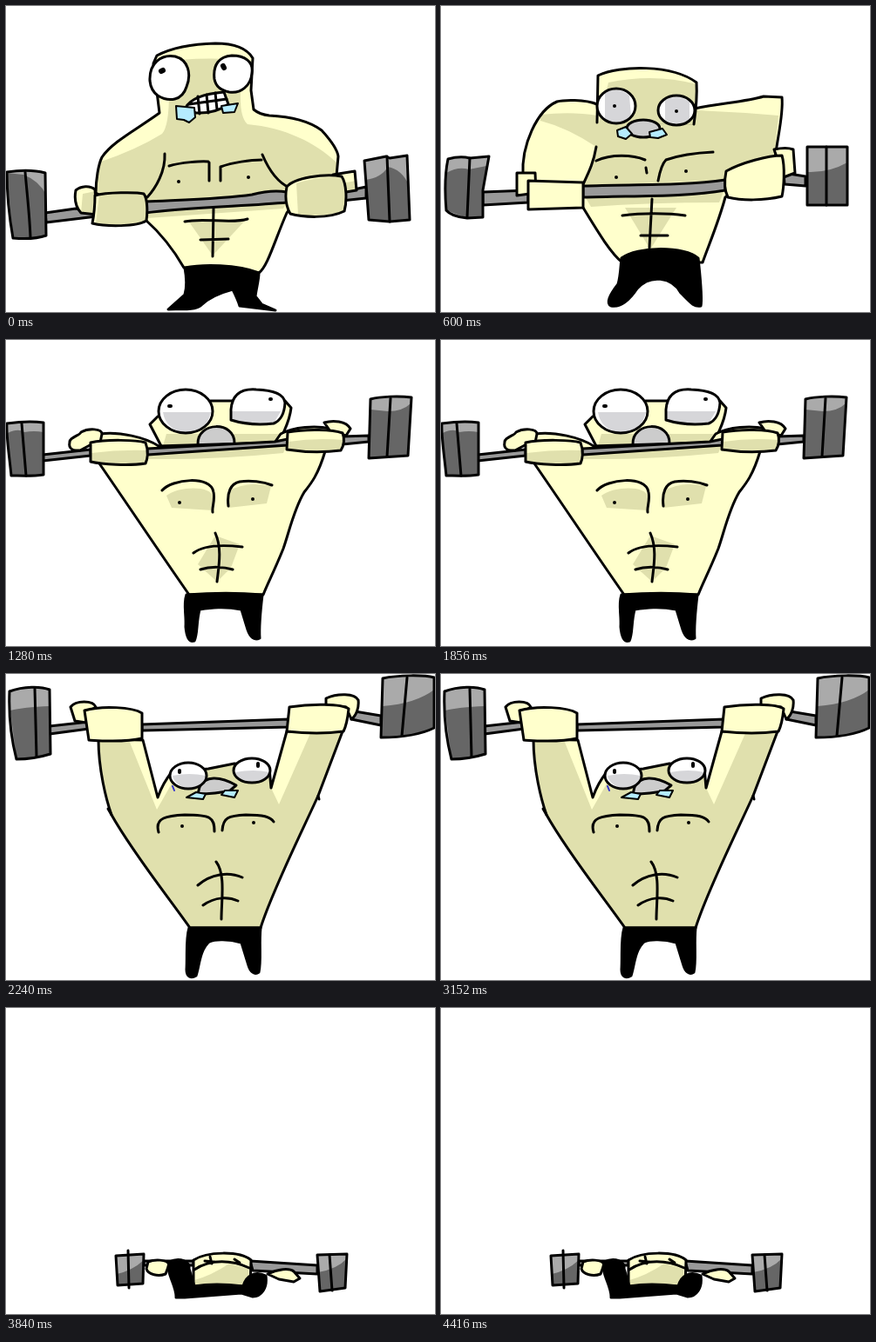
Recreate the animation shown at these times as an HTML page without scripts. Size 492x352 px, loop 4800 ms.

```html
<!DOCTYPE html>
<html lang="en">
<head>
<meta charset="utf-8">
<title>Weightlifter</title>
<style>
html, body { margin: 0; width: 100%; height: 100%; overflow: hidden; background: #fff; }
svg { display: block; width: 100%; height: 100%; }
path, ellipse { fill: none; stroke: #000; stroke-width: 3; stroke-linecap: round; stroke-linejoin: round; }
.skin { fill: #ffffcc; }
.metal { fill: #999; }
.disc { fill: #aaa; }
.white { fill: #fff; }
.black { fill: #000; }
.mouth { fill: #ccc; }
.tear { fill: #b5ecff; stroke-width: 2; }
.dot { stroke-width: 4; }
.shade, .dark, .dim { stroke: none; mix-blend-mode: multiply; }
.shade { fill: #e0e0d9; }
.dark { fill: #999; }
.dim { fill: #d6d6d9; }
/* poses sit side by side, 600 apart; the strip jumps between them */
#strip { animation: lift 4800ms step-end infinite; }
@keyframes lift {
  0% { transform: translateX(0); }
  12.5% { transform: translateX(-600px); }
  23.3333% { transform: translateX(-1200px); }
  26.6667% { transform: translateX(-1800px); }
  46.6667% { transform: translateX(-2400px); }
  78.3333% { transform: translateX(-3000px); }
  80%, 100% { transform: translateX(-3600px); }
}
</style>
</head>
<body>
<svg viewBox="0 0 492 352">
<g id="strip">

<!-- grip -->
<g>
  <path class="metal" d="M45 238L80 233L104 236V242L46 249ZM385 214L413 208V221L385 224Z"/>
  <path class="disc" d="M1 191C15 189 30 188 45 192L46 264C35 268 20 268 8 267C5 250 1 220 1 191ZM411 178L436 173L440 175L460 172L463 246L440 248L416 246Z"/>
  <path class="dark" d="M1 192L20 194Q38 201 46 217V264Q28 268 8 267ZM412 200Q430 198 438 185Q454 188 462 206L463 246L440 248L416 246Z"/>
  <path d="M22 191C24 215 27 240 28 266M437 173L440 248"/>
  <path class="skin" d="M176 123L169 66L173 57Q198 44 240 43C262 43 276 48 283 60L281 97L284 119Q291 125 302 126C325 127 347 132 362 143C372 154 380 164 381 173L378 207L335 222L322 238C308 270 300 300 290 307L204 301C192 280 178 262 160 246L103 215C103 200 106 182 110 174C122 156 150 142 176 123Z"/>
  <path class="shade" d="M171 66Q220 57 283 63L269 100Q268 128 277 136C320 140 355 157 379 180L378 205L322 222V226L318 233L162 244L160 225L104 214Q104 190 109 179Q150 165 179 147Q187 138 187 100Z"/>
  <path class="shade" d="M209 247L274 247L237 287Z"/>
  <path d="M182 170C183 190 172 209 162 220M294 171C302 190 312 203 325 209"/>
  <path class="metal" d="M160 225C200 223 250 222 282 217Q305 211 322 214V226C280 230 200 232 160 238Z"/>
  <path class="skin" d="M80 212C86 207 96 206 102 211L104 240L86 238Q77 228 80 212ZM375 194L400 190L402 212L378 216Z"/>
  <path class="shade" d="M88 216L103 213L104 240L86 238ZM380 205L401 201L402 212L378 216Z"/>
  <path class="skin" d="M102 218C115 214 150 214 158 216C163 222 162 240 161 247C150 254 115 254 99 250Q102 235 102 218ZM322 208C330 198 365 192 385 196C391 205 391 225 388 236C370 245 340 243 326 239C321 230 320 218 322 208Z"/>
  <path class="shade" d="M107 217Q140 214 158 217Q163 230 160 247Q130 254 103 250ZM333 204Q360 195 385 197Q391 215 388 236Q360 243 335 240Z"/>
  <path class="white" d="M165 86C164 66 178 55 194 58C209 62 213 78 207 93C202 109 187 111 174 103Q166 97 165 86ZM239 84C237 67 245 58 259 57C274 57 284 64 282 77C281 92 269 101 256 99Q241 96 239 84Z"/>
  <path d="M178 75L180 74M249 69L250 71" style="stroke-width:6"/>
  <path class="dot" d="M198 202h0M278 197h0"/>
  <path class="white" d="M206 117Q214 102 250 99L255 113Q240 124 218 123Z"/>
  <path stroke-width="2" d="M210 113L253 107M220 104L222 124M230 102L232 123M240 100L242 119"/>
  <path class="tear" d="M195 115L216 117L217 128L210 134L204 131L196 130ZM247 115L266 112L262 122L249 123Z"/>
  <path d="M187 184C200 180 225 178 232 179M233 180V201M246 201L246 185C260 180 280 177 293 177M238 233L237 288M205 248C225 243 260 251 277 245M223 269L255 268"/>
  <path class="black" d="M205 301C225 297 265 297 290 307C290 315 287 325 286 334L293 343L309 350L268 345C266 338 262 330 260 326C245 330 232 336 224 344C215 351 200 348 186 349L205 332C208 322 207 312 205 301Z"/>
</g>

<!-- chest height -->
<g transform="translate(600)">
  <path class="metal" d="M48 214L100 212V226L48 229ZM393 192L418 196V207L394 205Z"/>
  <path class="disc" d="M8 176Q22 172 33 175L55 173L48 212V243L30 244C20 243 10 240 6 235Q3 200 8 176ZM420 162H466V229H420Z"/>
  <path class="dark" d="M6 192Q20 184 32 188L52 184L48 212V243L30 244L6 235ZM420 191Q445 192 466 180V229H420Z"/>
  <path d="M33 175L30 243M442 162V229"/>
  <path class="skin" d="M179 113C165 107 140 108 133 110C110 120 92 160 94 195L163 232C180 260 195 285 208 295H300C305 280 318 250 326 220L383 176C386 150 393 125 391 105L370 104C350 110 320 112 291 118Z"/>
  <path class="shade" d="M114 125Q150 121 179 126L293 120Q340 122 387 126L382 174L326 196V200L163 207L178 162Q145 140 114 132ZM166 221L324 214L319 226Q240 226 172 231Z"/>
  <path class="shade" d="M211 232H270L240 280Z"/>
  <path class="skin" d="M179 134L180 80C205 68 265 67 293 88C294 104 292 122 290 136"/>
  <path class="shade" d="M192 88Q245 77 293 90L290 137L181 134Z"/>
  <path d="M178 162C175 180 170 190 163 205"/>
  <path class="metal" d="M163 207C220 205 280 207 326 200V212C280 220 220 218 163 220Z"/>
  <path class="skin" d="M87 192H108L109 215L87 218ZM382 165Q396 162 404 165L406 192L393 197Z"/>
  <path class="skin" d="M100 201L163 203V232L100 234ZM327 190C345 180 375 172 391 172C395 185 393 210 391 219C370 224 345 224 329 220C325 212 325 200 327 190Z"/>
  <ellipse class="white" cx="201" cy="115" rx="22" ry="20"/>
  <ellipse class="white" cx="270" cy="120" rx="21" ry="17"/>
  <path class="dim" d="M188 99Q205 93 216 103L218 127Q202 141 188 130ZM257 108Q272 101 285 110V131Q270 139 257 131Z"/>
  <path class="dot" d="M199 115h0M270 121h0M201 197h0M281 190h0"/>
  <ellipse class="mouth" cx="232" cy="141" rx="19" ry="10"/>
  <path class="tear" d="M202 143L212 139L219 147L212 153L203 150ZM239 145L254 141L259 148L249 152L240 151Z"/>
  <path d="M178 178C195 170 220 171 234 177M235 186L236 192M249 201C251 190 253 182 258 177C275 171 290 169 312 168M242 222L239 278M208 241C230 238 260 238 280 241M229 264H260"/>
  <path class="black" d="M207 290C225 276 280 276 295 290C297 310 300 335 298 345C290 347 285 340 275 330C265 312 240 308 225 325C215 340 205 347 195 345C189 342 193 333 203 320C206 310 206 298 207 290Z"/>
</g>

<!-- neck height -->
<g transform="translate(1200)">
  <path class="metal" d="M39 168L102 167V178L39 179ZM385 158H416V168L387 170Z"/>
  <path class="disc" d="M2 119L22 118L24 123L42 124L37 198L22 197L4 194ZM418 120C430 115 455 117 469 120L466 188C450 192 430 190 417 187Z"/>
  <path class="dark" d="M2 134L23 142L41 142L37 198L22 197L4 194ZM418 142Q450 147 468 128L466 188Q440 192 417 187Z"/>
  <path d="M23 120V197M443 117V190"/>
  <path class="skin" d="M175 115C140 108 100 97 80 97C68 98 62 112 68 122C78 135 95 148 102 158L138 186C160 220 185 280 206 294H297C312 265 325 215 338 178L375 142C410 125 437 105 434 90C430 80 405 80 380 88C350 100 320 122 292 117Z"/>
  <path class="shade" d="M90 122Q140 128 179 119L290 118Q330 120 367 107L348 152L326 160L162 172L125 161Z"/>
  <path class="shade" d="M180 179L238 178V201L190 207ZM254 179L312 177L305 192L254 198ZM240 225L270 245L240 280L217 247Z"/>
  <path class="skin" d="M183 135L166 95L174 85L218 70H255L304 78C302 95 293 114 288 128"/>
  <path class="shade" d="M194 104L222 80H260L292 96L296 103L288 129L183 135L176 116Z"/>
  <path class="metal" d="M162 171C220 163 270 160 326 160V168C270 170 220 170 162 178Z"/>
  <path class="skin" d="M90 158L112 155V164L102 178H92ZM376 146L397 147L396 157L385 163Z"/>
  <path class="skin" d="M102 162Q135 159 162 165V186L102 191ZM326 153Q360 149 387 154V178L326 177Z"/>
  <ellipse class="white" cx="197" cy="82" rx="23" ry="24"/>
  <ellipse class="white" cx="273" cy="75" rx="20" ry="21"/>
  <path class="dim" d="M175 80Q198 76 219 84Q215 104 197 105Q177 101 175 80ZM254 73Q275 68 292 76Q288 95 273 95Q256 92 254 73Z"/>
  <path class="dot" d="M184 71v2M285 72v1M200 196h0M282 190h0"/>
  <path class="mouth" d="M214 118C220 103 240 94 250 117Q232 124 214 118Z"/>
  <path class="tear" d="M205 122L224 121L222 130L213 127ZM238 122L254 118L259 125L248 129Z"/>
  <path d="M185 178C205 175 235 176 237 182L238 200M251 199C251 185 253 178 260 176H310M242 224V280M208 244C220 240 255 241 277 241M229 265H259"/>
  <path class="black" d="M206 293C230 290 270 290 296 293C294 310 293 330 291 341C287 345 282 342 279 330L276 315C255 314 235 312 226 314C222 325 220 335 215 344C210 347 205 345 205 338Z"/>
</g>

<!-- mouth height -->
<g transform="translate(1800)">
  <path class="metal" d="M42 132L97 126V133L42 139ZM386 111L416 110V117L386 120Z"/>
  <path class="disc" d="M1 96C15 94 30 93 43 95V155C30 157 15 156 6 156C4 135 0 110 1 96ZM418 68C430 65 450 64 465 66L461 133L416 136Z"/>
  <path class="dark" d="M2 107Q14 101 21 106Q32 104 43 106V155Q20 158 6 156ZM418 80L438 82Q455 82 464 73L461 133L416 136Z"/>
  <path d="M18 96L23 156M441 67L437 134"/>
  <path class="skin" d="M178 122L165 97L174 88L235 70H260L320 70L327 78C325 95 315 115 308 122"/>
  <path class="shade" d="M184 108H314L308 122H180Z"/>
  <path class="mouth" d="M220 120C219 93 263 93 262 119"/>
  <path class="skin" d="M108 108C130 105 160 112 175 122L308 118L315 108C330 100 355 98 372 102L366 128C358 155 350 165 342 175C330 195 325 220 318 240C308 265 300 280 295 293H210C180 250 140 190 107 142Z"/>
  <path class="shade" d="M163 131L322 121L318 130Q240 138 163 137ZM184 179C200 167 236 168 237 180V196L190 193ZM255 174Q275 162 304 168L299 188L255 193ZM240 225L268 235L258 262L242 278L220 258Z"/>
  <path class="metal" d="M162 125L308 117L323 114V121L162 132Z"/>
  <path class="skin" d="M73 118C72 112 85 110 86 106C95 101 110 102 110 108L108 118L98 120L85 127C73 128 72 122 73 118ZM365 95C375 92 390 93 395 102L390 110L372 105Z"/>
  <path class="skin" d="M97 118C115 114 150 115 160 118C164 128 162 138 160 142C140 145 110 143 97 140ZM323 106C345 102 375 103 386 107C389 115 387 122 384 127C360 130 335 128 322 126Z"/>
  <path class="shade" d="M98 130Q130 126 161 127L160 141Q125 144 98 139ZM324 117Q355 112 387 115L384 126Q345 129 324 125Z"/>
  <ellipse class="white" cx="206" cy="82" rx="31" ry="25"/>
  <path class="white" d="M258 80Q260 55 287 57Q318 58 320 72Q319 91 307 96Q280 99 258 92Z"/>
  <path class="dim" d="M180 83H235Q230 106 206 107Q183 103 180 83ZM259 82H315L307 96Q280 99 259 92Z"/>
  <path class="dot" d="M187 76h2M303 68h1M199 187h0M283 183h0"/>
  <path d="M179 173C190 160 235 155 238 175C240 185 236 192 237 198M255 191C253 175 258 165 268 163C280 161 295 163 305 167M240 222C248 240 244 260 242 278M215 245C225 237 245 235 271 238M223 264C235 260 250 261 260 264"/>
  <path class="black" d="M207 293C235 291 270 291 294 293C292 310 290 330 291 343C285 346 280 342 277 333L270 310C250 306 235 308 222 310C218 325 220 338 216 346C210 348 207 342 206 330C207 315 203 305 207 293Z"/>
</g>

<!-- overhead -->
<g transform="translate(2400)">
  <path class="metal" d="M50 60L95 55V63L50 69ZM400 43L430 48V59L396 52Z"/>
  <path class="disc" d="M4 20C20 14 40 14 50 18L51 92C35 97 20 98 12 98C6 75 3 45 4 20ZM432 5C450 1 480 1 491 4V62C475 70 450 73 430 73Z"/>
  <path class="dark" d="M5 42Q20 38 50 37L51 92Q30 98 12 98ZM432 37Q470 34 491 18V62Q465 73 430 73Z"/>
  <path d="M33 17L35 95M460 4L454 71"/>
  <path class="skin" d="M106 75C106 110 115 145 121 162C145 205 185 255 211 292H292C305 250 340 180 358 140L386 66H322L304 131L302 108L262 103L232 109L190 113Q180 125 174 142L157 76Z"/>
  <path class="shade" d="M106 76H141L173 156L190 126V113L232 109L262 103L302 108L304 131L313 150L350 66H386L358 140C340 180 305 250 292 292H211C185 255 145 205 121 162Q106 115 106 76Z"/>
  <path d="M121 162L117 155M358 140L359 144"/>
  <path class="metal" d="M156 58L325 52V61L156 65Z"/>
  <path class="skin" d="M74 38C80 30 100 30 103 38L92 45V56L79 54ZM367 28C380 22 400 22 404 30C405 38 402 48 396 52L390 38L367 36Z"/>
  <path class="skin" d="M90 42C110 36 145 38 156 45V74C135 79 110 77 95 76ZM325 38C350 34 385 34 393 40C392 50 390 60 387 66C365 69 340 68 322 66Z"/>
  <path class="mouth" d="M222 130C228 117 245 117 264 128L257 134C245 137 232 138 220 138Z"/>
  <ellipse class="white" cx="209" cy="117" rx="21" ry="15"/>
  <ellipse class="white" cx="282" cy="111" rx="21" ry="14"/>
  <path class="dim" d="M191 117Q210 113 229 117Q225 131 209 131Q194 129 191 117ZM263 113Q284 109 302 113Q295 125 280 124Q265 122 263 113Z"/>
  <path class="dot" d="M199 111v2M289 103v3M202 175h0M284 171h0"/>
  <path d="M191 129L193 134" style="stroke:#33c;stroke-width:2"/>
  <path class="tear" d="M207 142L218 136L229 138L226 144ZM247 139L251 134L266 134L262 142Z"/>
  <path d="M175 182C170 165 185 163 205 162C235 162 239 165 239 181M248 180C249 165 255 163 275 162C295 162 303 164 307 170M241 216C252 230 247 260 247 282M220 243C235 230 255 227 271 234M226 266C240 256 255 256 266 261"/>
  <path class="black" d="M210 292H292C290 310 293 330 290 343C285 347 280 342 278 335L270 309C255 305 240 305 233 308C222 318 222 335 218 347C212 351 207 348 207 340C208 322 206 305 210 292Z"/>
</g>

<!-- collapse -->
<g transform="translate(3000)">
  <path class="metal" d="M86 165L117 139L120 152L93 174ZM162 135L186 134V140L163 139ZM287 132L318 126V135L290 140ZM370 127Q400 136 419 152L410 161Q395 145 374 138Z"/>
  <path class="disc" d="M47 167C55 161 70 155 80 152L84 157L99 181C92 189 86 198 77 200L70 202ZM407 167L436 142L448 147L475 194L432 203Z"/>
  <path class="dark" d="M61 159L80 152L99 181Q90 194 72 202Q76 177 61 159ZM407 167L436 142L448 147L460 169Q447 180 446 200L432 203Z"/>
  <path d="M73 157Q84 172 85 192M417 181L469 166"/>
  <path class="skin" d="M121 150C122 178 127 187 139 196C170 210 187 260 205 308H287C290 285 297 250 306 230C328 203 352 196 360 178L371 146L310 143L302 182L290 181L302 143L286 134L240 125L186 137Q180 152 174 175L165 150Z"/>
  <path class="shade" d="M122 152H147L177 190L188 139H284L279 190L308 192L344 145H371L360 178C352 196 328 203 306 230Q291 275 287 308H205C187 260 170 210 139 196Q124 187 122 152Z"/>
  <path class="skin" d="M107 122L126 121L125 129L117 137L108 135ZM353 104C365 100 380 102 384 107L383 122L374 129L370 111Z"/>
  <path class="skin" d="M119 134L123 129Q145 125 160 126Q165 128 165 135L163 152Q150 156 140 153L118 149ZM317 111Q345 108 371 112L371 146L317 143Z"/>
  <path class="shade" d="M119 134L136 128L148 153L118 149ZM344 144L366 112L371 113V146Z"/>
  <path class="white" d="M190 142C183 125 187 100 211 97C230 98 233 115 231 142Q210 149 190 142ZM242 142C237 125 243 105 264 102C282 104 288 120 285 142Q262 149 242 142Z"/>
  <path class="dim" d="M190 139H230V143Q210 148 190 142ZM242 138H285V142Q262 148 242 142Z"/>
  <path class="dot" d="M205 115h2M268 121h2M209 213h0M269 212h0"/>
  <path class="mouth" d="M209 170Q217 167 219 159Q227 151 240 151Q256 153 256 160L253 171L245 165Q240 170 231 171L221 175Z"/>
  <path d="M223 172L232 163L240 165L233 170Z" style="fill:#b5ecff;stroke:none"/>
  <path d="M187 201C200 194 225 195 231 205L232 216M247 216C248 205 258 195 280 194M239 233Q237 240 242 246L246 308M220 255C232 247 245 249 258 250L255 255M236 273Q245 276 255 272"/>
  <path class="black" d="M187 304C193 296 208 297 212 310C235 307 255 311 268 314C275 300 290 293 300 298C302 310 298 326 288 332C278 335 270 328 262 327H217C215 338 206 341 200 338C190 325 185 314 187 304Z"/>
</g>

<!-- on the floor -->
<g transform="translate(3600)">
  <path class="metal" d="M158 291H215V296H158ZM280 291L357 296V306L283 302Z"/>
  <path class="disc" d="M126 285L158 283L157 317L128 319ZM357 284L391 283L389 322L360 326Z"/>
  <path class="dark" d="M127 306Q145 302 158 290L157 317L128 319ZM358 304Q380 300 390 289L389 322L360 326Z"/>
  <path d="M140 279L141 322M371 284L374 325"/>
  <path class="skin" d="M163 292C170 289 185 289 187 295L183 306C175 309 163 307 161 300ZM300 306C312 300 325 299 330 303L337 311L330 315L313 312Z"/>
  <path class="skin" d="M215 290C230 280 268 279 281 290L280 320H215Z"/>
  <path class="shade" d="M216 313Q235 308 256 294L278 300L279 320H216Z"/>
  <path d="M216 301C235 288 260 290 279 299M228 291L239 292M234 286L236 294M262 289L268 293"/>
  <path class="black" d="M187 292C200 286 211 292 210 300L216 320C235 317 255 318 272 320C275 308 285 302 298 308C300 322 293 332 283 332L270 328L205 333L195 333C196 320 183 305 187 292Z"/>
</g>

</g>
</svg>
</body>
</html>
```
